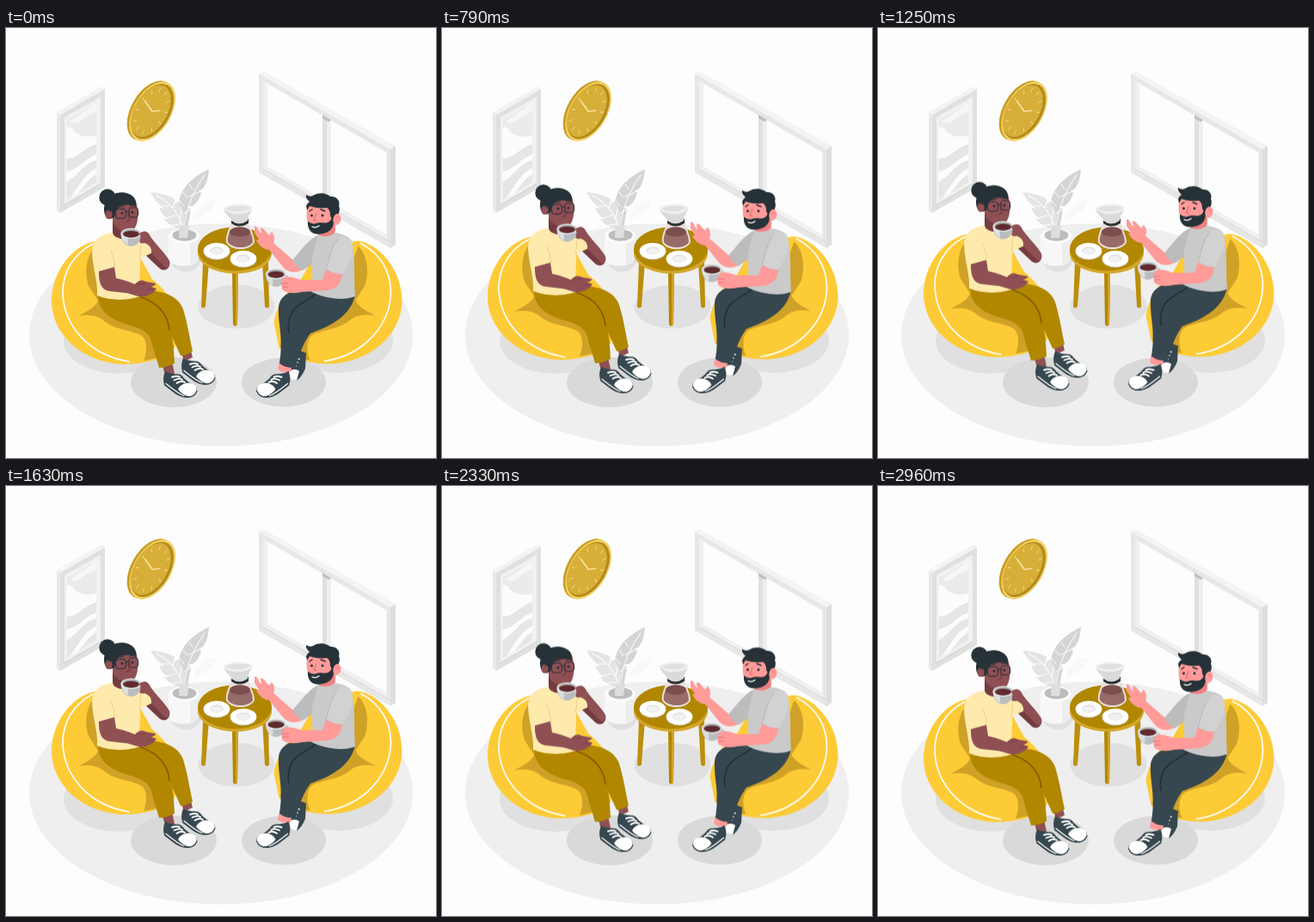
An HTML page that plays this animation: 500x500 px, repeating every 3 s.

```html
<!DOCTYPE html>
<html lang="en">
<head>
<meta charset="utf-8">
<title>Coffee chat</title>
<style>
  html, body { margin: 0; width: 100%; height: 100%; overflow: hidden; background: #fdfdfd; }
  svg { display: block; width: 100%; height: 100%; }
  .line { fill: none; stroke-linecap: round; stroke-linejoin: round; }
  .bag { fill: #fdcb36; }
  .bagshade { fill: #cfa127; }
  .pants { fill: #b18700; }
  .brown { fill: #8f5054; }
  .browndark { fill: #743b40; }
  .pink { fill: #ff9b98; }
  .dark { fill: #37474f; }
  .ink { fill: #263238; }
  .shadow { fill: #e0e0e0; }
</style>
</head>
<body>
<svg viewBox="0 0 500 500">
  <defs>
    <g id="shoe">
      <path class="dark" d="M185 399C182 407 183 413 185 416C192 421 199 428 208 429.500C216 431 223 426 222 419C219 414 210 412 206 406C203 401 197 403 194 402Q189 402 185 399Z"/>
      <path d="M202 417C207 412 215 411 220 416C224 421 221 427 214 428.500C208 428 203 424 200 420Z" fill="#fff"/>
      <path class="line" d="M184.500 415C193 421 199 428.500 209 429.200Q219 430 222 422" stroke="#37474f" stroke-width="1.300"/>
      <path class="line" d="M186 413.500C194 420 201 426 207 427.500" stroke="#fff" stroke-width="1.200"/>
      <path class="line" d="M193 406q6-2 9 0M195.500 409.500q6-3 9.500-.5M198.500 413q5-3.500 9.500-1" stroke="#fff" stroke-width="1.900"/>
    </g>
    <g id="cup">
      <path d="M-12 0C-12 9-7 14.500 0 15C7 14.500 11 9 12 0Z" fill="#b9bdc0"/>
      <path d="M-11.500 3Q-9 11-4 14Q-3 9-4 5Z" fill="#dcdfe0"/>
      <ellipse rx="12" ry="6.200" fill="#e4e6e7"/>
      <ellipse rx="10.300" ry="4.900" fill="#a6a9ab"/>
      <ellipse cy=".8" rx="9.300" ry="3.900" fill="#602a2e"/>
    </g>
    <g id="plate">
      <ellipse cy="1" rx="15.300" ry="9.400" fill="#d9d9d9"/>
      <ellipse rx="15.300" ry="9.200" fill="#fff"/>
      <ellipse rx="8" ry="4.700" fill="#e3e3e3"/>
      <ellipse cy=".6" rx="6.600" ry="3.600" fill="#f1f1f1"/>
    </g>
    <g id="seat">
      <path class="bag" d="M105 248C80 251 53 281 53 318C54 359 92 391 140 391C166 390 186 384 196 372L202 343C198 318 182 302 170 292L150 256Z"/>
      <path class="bagshade" d="M104 254C93 265 91 284 96 300L107 317C105 324 94 330 84 335C95 333 105 334 112 339C126 352 148 351 158 358C165 364 164 378 160 387Q182 384 195 372L190 340L120 300Z"/>
      <path class="line" d="M101 251C78 263 66 284 66 308C67 345 95 380 143 388" stroke="#fff" stroke-width="1.700"/>
    </g>
  </defs>

  <ellipse cx="250" cy="357" rx="223" ry="129.500" fill="#efefef"/>

  <!-- picture -->
  <path d="M59 98L111 68L115 71L63 101Z" fill="#f3f3f3"/>
  <path d="M59 98L63 101V215L59 212Z" fill="#e9e9e9"/>
  <path d="M63 101L115 71V185L63 215Z" fill="#e0e0e0"/>
  <path d="M68 104L110 80V182L68 206Z" fill="#f1f1f1"/>
  <path d="M70.500 106.500L105 87V179.500L70.500 200Z" fill="#fcfcfc"/>
  <path d="M70.500 106.500L105 87V125C94 128 82 126 77 117Q73 114 70.500 116Z" fill="#ebebeb"/>
  <path d="M74 109Q83 112 88 107T105 97V87Z" fill="#f6f6f6"/>
  <path d="M70.500 152C83 152 91 139 105 135V147C91 152 87 163 70.500 167ZM70.500 179C82 174 90 157 105 154V163C93 168 86 181 75 197L70.500 200ZM84 192C92 183 97 174 105 170V179.500Z" fill="#e6e6e6"/>
  <path class="line" d="M68 206L110 181" stroke="#d3d3d3" stroke-width="1.200"/>

  <!-- window -->
  <path d="M294 53L299 50L453 137L447 141Z" fill="#f4f4f4"/>
  <path d="M447 141L453 137V252L447 256Z" fill="#dedede"/>
  <path d="M294 53L447 141V256L294 168Z" fill="#e7e7e7"/>
  <path d="M299 61L368 101V204L299 164Z" fill="#f0f0f0"/>
  <path d="M304 65L368 102V198L304 161Z" fill="#fdfdfd"/>
  <path d="M373 104L443 144V247L373 207Z" fill="#f0f0f0"/>
  <path d="M378 108L442 145V240L378 203Z" fill="#fdfdfd"/>
  <path d="M368 101L378 107V210L368 204Z" fill="#e0e0e0"/>
  <path d="M373 104L378 107V210L373 207Z" fill="#efefef"/>
  <path d="M368 101L378 107L375 109L368 105Z" fill="#bfbfbf"/>
  <path class="line" d="M299 164L447 249" stroke="#d9d9d9" stroke-width="1"/>

  <!-- clock -->
  <g transform="matrix(.866 -.5 0 1 167.500 96)"><circle r="31" fill="#c99e22"/></g>
  <g id="clock" transform="matrix(.866 -.5 0 1 170.200 97)">
    <circle r="31" fill="#f3d062"/>
    <circle r="28.700" fill="#b18a1c"/>
    <circle cx="-2" cy="-1.500" r="27" fill="#d7ae38"/>
    <path class="line" d="M-10-17L0 0L10 4" stroke="#f6e2a0" stroke-width="1.500"/>
  </g>

  <!-- plant -->
  <ellipse class="shadow" cx="209" cy="267" rx="18" ry="16.500"/>
  <path d="M218 222C222 207 234 199 244 201C241 211 230 220 218 222Z" fill="#f8f8f8"/>
  <path d="M207 243C200 226 203 218 201 207C201 191 211 176 236 164C235 173 234 180 229 187L223 190L227 191C225 199 222 204 217 207L211 208L215 211C213 223 211 230 210 243Z" fill="#d5d5d5"/>
  <path class="line" d="M208 243Q205 208 231 171M207 207L202 201M211 197L206 191M217 187L213 182M207 216L214 211M213 196L224 191" stroke="#fafafa" stroke-width="1.100"/>
  <path d="M206 243C204 232 198 233 188 227L184 222L189 222Q181 218 178 209L184 210C176 204 172 198 168 191C181 192 191 195 196 199L196 204L200 202C208 211 210 225 209 243Z" fill="#e4e4e4"/>
  <path class="line" d="M207 242C205 219 192 203 175 195M189 207L181 207M197 218L187 221M202 228L194 229M194 209L196 202M202 221L204 211" stroke="#fdfdfd" stroke-width="1.100"/>
  <path d="M189 242V269C192 278 218 280 223 270L225 242Z" fill="#f7f7f7"/>
  <path d="M214 250L225 243L223 270Q220 275 214 276Z" fill="#ededed"/>
  <ellipse cx="207" cy="242" rx="18" ry="9" fill="#fbfbfb"/>
  <ellipse cx="207.500" cy="241" rx="14" ry="6.800" fill="#bdbdbd"/>
  <path d="M201 244Q201 232 203 230L213 230L211 244Z" fill="#dedede"/>

  <!-- fixed shadows -->
  <g class="shadow">
    <ellipse cx="268" cy="324" rx="44.500" ry="25.500"/>
    <ellipse cx="131" cy="364" rx="64" ry="38"/>
    <ellipse cx="386" cy="363" rx="64" ry="38"/>
  </g>
  <g fill="#d9d9d9">
    <ellipse cx="195" cy="412" rx="50" ry="29"/>
    <ellipse cx="323" cy="412" rx="49" ry="28.500"/>
  </g>

  <!-- table -->
  <path d="M229 272H236L232 324Q229 327 227 324ZM298 272H305L306 324Q304 327 301 324Z" fill="#bb8f0c"/>
  <path d="M263 284H270L269 345Q266.500 348 264 345Z" fill="#b18700"/>
  <path d="M267 284H270L269 345L267 346Z" fill="#d0a326"/>
  <path d="M223 256V263C227 292 305 294 309 263V256Z" fill="#d4a72b"/>
  <ellipse cx="266" cy="257" rx="43" ry="25.500" fill="#b18700"/>
  <use href="#plate" x="245" y="259"/>
  <use href="#plate" x="276" y="268"/>

  <!-- carafe -->
  <path d="M263 225C259 233 255 242 256 249C261 260 284 260 289 249C289 242 284 232 281 225Z" fill="#eadfdb"/>
  <path d="M260 237Q257 244 258 249C264 257 282 257 287 249Q287 243 284 237Z" fill="#976c68"/>
  <ellipse cx="272" cy="237" rx="12" ry="5.800" fill="#7a4f4d"/>
  <path d="M262 222V227Q271 234 282 227V222Z" fill="#2d3437"/>
  <path d="M253 210C255 218 261 219 262 224Q271 231 281 224C281 218 285 216 286 209Z" fill="#dadada"/>
  <path d="M252.500 210C255 204 284 203 287 209C282 218 260 219 252.500 210Z" fill="#efefef"/>
  <path d="M256 210C261 206 280 206 284 209C278 214 262 215 256 210Z" fill="#e0e0e0"/>

  <g id="people">
    <!-- woman -->
    <use href="#seat"/>
    <path class="brown" d="M203 374L214 372L217 383L207 388Z"/>
    <use href="#shoe" x="21" y="-15"/>
    <path class="pants" d="M140 307C168 302 198 306 206 327C211 343 213 358 217 376Q210 381 203 381L182 335Z"/>
    <path class="brown" d="M181 389L193 388L196 402Q190 405 184 400Z"/>
    <use href="#shoe"/>
    <path class="pants" d="M107 309C107 330 121 339 145 346C165 352 168 357 171 372L178 395Q187 395 196 390C195 371 194 354 187 340C180 327 169 320 155 314Z"/>
    <path class="line" d="M157 313C177 320 188 333 190 351" stroke="#7e5f00" stroke-width="1.800"/>
    <path class="browndark" d="M155 243C158 234 165 235 168 243C175 253 186 263 190 271C192 279 185 284 179 280L161 263Z"/>
    <path class="brown" d="M155 246C157 234 165 235 168 243C175 253 186 263 190 271C191 276 188 280 185 278L163 256Z"/>
    <path d="M124 238C108 240 100 247 100 261C101 280 107 295 106 311C122 318 145 317 158 311C153 296 157 281 156 268L169 262C170 254 165 251 158 249L149 240Z" fill="#ffeaae"/>
    <path class="line" d="M155 268Q158 260 156 252M127 278Q125 266 122 259" stroke="#edd38a" stroke-width="1"/>
    <path class="brown" d="M108 283L126 278L128 291C137 293 143 295 150 298C155 292 159 293 163 295L174 297Q175 299 169 301L175 303Q172 309 162 312C153 314 145 308 138 308L120 306C109 304 108 293 108 283Z"/>
    <path class="line" d="M151 298Q157 299 162 297M164 304L171 304" stroke="#743b40" stroke-width=".8"/>
    <path class="browndark" d="M124 222L145 228V239Q140 248 130 244Q123 241 124 236Z"/>
    <circle class="ink" cx="118" cy="197" r="9.700"/>
    <path class="brown" d="M124 206L151 202C155 214 154 229 148 235C141 240 128 235 124 226Z"/>
    <path class="ink" d="M114 212C114 199 124 190 138 191.500C147 193 153 199 151 208C144 204 137 206 132 207Q128 212 126 220L122 222Q114 220 114 212Z"/>
    <ellipse class="brown" cx="119.500" cy="217" rx="4.200" ry="5.200"/>
    <path class="line" d="M120 213L127 212M139 214L143 213" stroke="#263238" stroke-width="1.200"/>
    <g class="line" stroke="#35393e" stroke-width="1.300">
      <rect x="127.500" y="210.500" width="12" height="11" rx="3.500" transform="rotate(-4 133 216)"/>
      <rect x="143" y="209" width="10.500" height="11" rx="3.500" transform="rotate(-4 148 214)"/>
      <path d="M130 208.500L137 207M144 206.500L150 206"/>
    </g>
    <circle class="ink" cx="135" cy="215.500" r="1.400"/>
    <circle class="ink" cx="147" cy="214.500" r="1.400"/>
    <path class="line" d="M142 216L144 224L140 225" stroke="#6a3338" stroke-width="1"/>
    <use href="#cup" x="145.500" y="239"/>
    <path class="brown" d="M155 239Q160 235 163 238L165 247Q160 253 155 249L157 244Z"/>

    <!-- man -->
    <use href="#seat" transform="matrix(-1 0 0 1 513.500 -.5)"/>
    <g transform="translate(526 -17) scale(-1 1)">
      <path class="dark" d="M177 395L193 389L198 412Q195 426 188 427Q182 423 178 413Z"/>
      <path d="M188 427L195 425L197 416Q190 412 185 416Z" fill="#fff"/>
      <path class="line" d="M185 402l7-2M187 406l8-2M189 410l8-2" stroke="#fff" stroke-width="1.500"/>
    </g>
    <path class="pink" d="M318 387L333 390L331 400Q322 402 316 397Z"/>
    <use href="#shoe" transform="matrix(-1 0 0 1 513.500 0)"/>
    <path class="dark" d="M356 304C335 303 318 309 317 325C316 345 323 360 318 390Q327 397 337 394C341 379 347 364 354 355C374 348 402 336 406 309Z"/>
    <path class="line" d="M362 307C356 316 336 320 331 334Q327 345 329 354" stroke="#222e35" stroke-width="1.500"/>

    <path class="pink" d="M345 281C337 286 327 284 322 278L306 258C299 258 294 252 291 247L294 246L289 238L289 231Q292 230 294 236L297 240L296 233Q299 232 303 238L306 241L309 237Q314 243 311 250L334 270Z"/>
    <path d="M364 240C350 247 343 259 333 270Q337 278 345 282L362 270Z" fill="#bcbcbc"/>
    <path d="M363 239C377 235 396 239 401 246C407 267 404 288 406 312C392 318 368 314 354 306C358 294 355 279 356 267Z" fill="#cacaca"/>
    <path d="M388 243C379 251 376 267 372 281Q381 287 391 287C400 274 407 256 401 246Q396 241 388 243Z" fill="#d2d2d2"/>
    <path class="line" d="M386 246C378 254 376 269 372 281Q381 287 391 287" stroke="#b4b4b4" stroke-width=".9"/>
    <use href="#cup" x="314" y="286"/>
    <path class="line" d="M325 288Q330 288 325 296" stroke="#b9bdc0" stroke-width="1.700"/>
    <path class="pink" d="M372 281Q382 287 391 286C390 299 383 304 373 305L344 307C335 309 326 309 321 304L320 296L323 290Q329 289 334 290L343 293L368 293Z"/>
    <path class="line" d="M321 297L328 297M322 301L328 301" stroke="#d86f70" stroke-width=".8"/>

    <path class="pink" d="M364 226L384 218L383 237Q377 245 364 241Z"/>
    <path d="M365 237Q377 235 382 227V238Q375 244 364 241Z" fill="#ed7f80"/>
    <path class="pink" d="M351 205L381 204L380 228C372 240 357 240 352 230C349 222 349 214 351 205Z"/>
    <path class="ink" d="M349 207Q350 204 353 202Q348 198 349 194Q353 197 357 195C365 190 374 193 377 196C385 195 389 202 387 207C389 211 387 215 386 218L380 225L377 218Q377 211 373 209C366 210 358 209 353 207L350 212Z"/>
    <path class="ink" d="M351 225Q357 229 361 227C368 224 374 231 379 221L381 225C381 234 374 239 366 239.500C356 241 350 235 351 225Z"/>
    <ellipse class="pink" cx="385" cy="222.500" rx="4.500" ry="6.500" transform="rotate(12 385 222)"/>
    <path class="line" d="M384 220Q387 219 387 222" stroke="#df7476" stroke-width=".9"/>
    <path class="line" d="M356 231Q360 233 364 230" stroke="#fff" stroke-width="1.300"/>
    <circle class="ink" cx="355.500" cy="218" r="1.500"/>
    <circle class="ink" cx="368" cy="218" r="1.500"/>
    <path class="line" d="M353 213L356 211M366 211L371 213" stroke="#263238" stroke-width="1.400"/>
    <path class="line" d="M361 216L358 223L361 224" stroke="#dc6568" stroke-width="1"/>
  </g>
</svg>
<script>
  const clock = document.getElementById("clock");
  for (let i = 0; i < 12; i++) {
    const tick = document.createElementNS("http://www.w3.org/2000/svg", "path");
    tick.setAttribute("d", "M0-24V-20");
    tick.setAttribute("transform", `translate(-1 -1) rotate(${i * 30})`);
    tick.setAttribute("class", "line");
    tick.setAttribute("stroke", "#f1d98d");
    clock.append(tick);
  }

  // Seats and sitters rise and sink at constant speed; shadows stay.
  const lift = y => ({ transform: `translate(0px, ${y}px)` });
  document.getElementById("people").animate([lift(0), lift(-10), lift(0)], {
    duration: 3000, iterations: Infinity, easing: "linear"
  });
</script>
</body>
</html>
```
